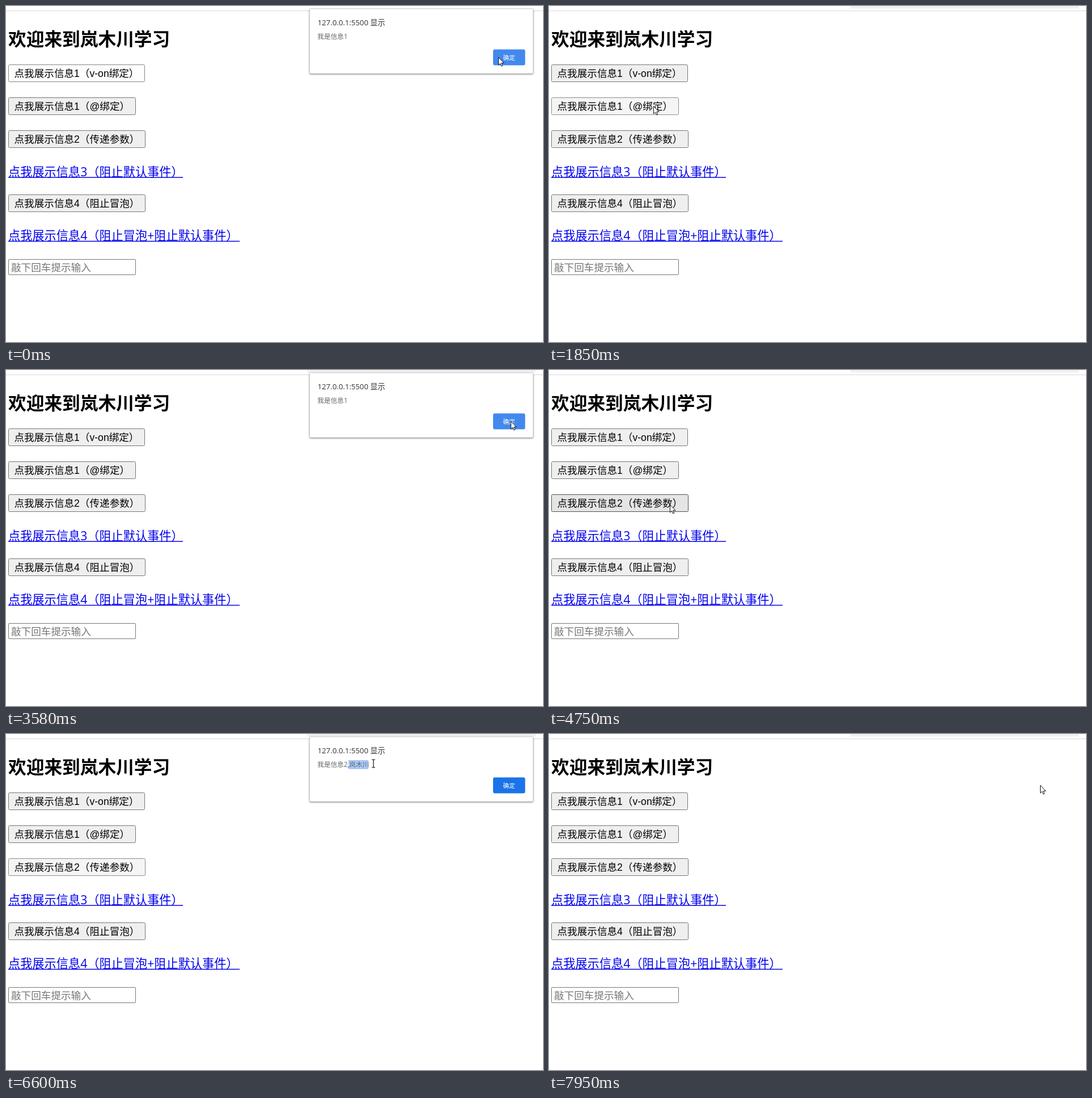
Animation, 947 px wide and 592 px high, one loop 8 s. Source, as an HTML page:

```html
<!DOCTYPE html>
<html lang="zh-CN">
<head>
<meta charset="utf-8">
<style>
  html, body { margin: 0; width: 100%; height: 100%; overflow: hidden; background: #fff; }
  svg { display: block; }
  text { font-family: "Open Sans", "Noto Sans CJK SC", sans-serif; white-space: pre; }
  .arial { font: 17.6px "Liberation Sans", "Noto Sans CJK SC", sans-serif; }
  .link { font-size: 21.2px; fill: #00e; }
  .panel { filter: drop-shadow(0 1px 1.5px rgba(0,0,0,.5)); }
</style>
</head>
<body>
<svg width="947" height="592" viewBox="0 0 947 592">
  <rect id="strip" x="531" width="403" height="4.5" fill="#f1f1f1"/>
  <path d="M0 8.5H947" stroke="#d8d8d8"/>
  <text x="4" y="69.5" font-size="31.7" font-weight="700">欢迎来到岚木川学习</text>
  <g id="buttons"></g>
  <text class="link" x="4" y="299.5">点我展示信息3（阻止默认事件）</text>
  <text class="link" x="4" y="412">点我展示信息4（阻止冒泡+阻止默认事件）</text>
  <path d="M4 302H312M4 414.5H412" stroke="#00e" stroke-width="1.6"/>
  <rect x="4.5" y="446.5" width="224" height="27" rx="1.5" fill="#fff" stroke="#767676"/>
  <text class="arial" x="9" y="466.5" fill="#757575">敲下回车提示输入</text>
  <g id="dialog">
    <rect class="panel" x="535.5" y="5" width="394" height="114" rx="2" fill="#fff" stroke="#c4c4c4" stroke-width=".6"/>
    <text x="549.5" y="34" font-size="13.2" fill="#303236">127.0.0.1:5500 显示</text>
    <rect id="selection" x="604" y="46" height="16" fill="#a8c9f8"/>
    <text id="message" x="549" y="58" font-size="11.7" fill="#65686d"></text>
    <rect id="ok" x="859" y="76.5" width="56.5" height="28" rx="3"/>
    <text x="876.5" y="95" font-size="10.7" font-weight="500" fill="#fff">确定</text>
  </g>
  <path id="arrow" d="M.5 .5V14L3.6 11.2L5.7 16L7.8 15.1L5.8 10.4H10Z" fill="#fff" stroke="#111" stroke-width="1"/>
  <path id="beam" d="M-3 -7H-1L0 -6L1 -7H3M0 -6V6M-3 7H-1L0 6L1 7H3" fill="none" stroke="#111" stroke-width="1.2"/>
</svg>
<script>
const LOOP = 8000, STEP = 89.66;
const $ = id => document.getElementById(id);

const labels = [
  [103, 240, '点我展示信息1（v-on绑定）'],
  [161, 224, '点我展示信息1（@绑定）'],
  [219, 241, '点我展示信息2（传递参数）'],
  [332, 241, '点我展示信息4（阻止冒泡）']
];
$('buttons').innerHTML = labels.map(([y, w, label]) =>
  `<rect x="4.5" y="${y + .5}" width="${w}" height="30" rx="2"/>
   <text class="arial" x="14.5" y="${y + 22}">${label}</text>`).join('');
const boxes = document.querySelectorAll('#buttons rect');

const looks = {
  normal: ['#efefef', '#767676'],
  hover: ['#e5e5e5', '#4f4f4f'],
  active: ['#f5f5f5', '#8d8d8d'],
  pressed: ['#fdfdfd', '#858585']
};

// Pointer path: time, x, y
const path = [
  [0, 868, 90], [60, 868, 90], [850, 543, 105], [1570, 184, 176],
  [2210, 184, 176], [3030, 841, 77], [3490, 890, 90], [3670, 890, 90],
  [3830, 886, 90], [4660, 224, 234], [4720, 213, 237], [5200, 213, 237],
  [5520, 325, 215], [5880, 614, 74], [6230, 607, 53], [6340, 607, 53],
  [6600, 648, 52], [6880, 648, 52], [7410, 881, 90], [7600, 881, 90],
  [7700, 866, 90], [LOOP, 866, 90]
];

function pointer(t) {
  const i = Math.max(1, path.findIndex(p => p[0] >= t));
  const [t0, x0, y0] = path[i - 1], [t1, x1, y1] = path[i];
  const k = (t - t0) / (t1 - t0), e = k * k * (3 - 2 * k);
  return [x0 + (x1 - x0) * e, y0 + (y1 - y0) * e];
}

const within = (t, a, b) => t >= a && t < b;
const show = (el, on) => el.style.display = on ? '' : 'none';

function buttonState(i, t, x) {
  if (i === 0 && t < 60) return 'pressed';
  if (i === 1 && within(t, 1400, 3550))
    return t >= 1840 ? 'active' : x < 228 ? 'hover' : 'normal';
  if (i === 2 && within(t, 4450, 7690))
    return t >= 4980 ? 'active' : x < 245 ? 'hover' : 'normal';
  return 'normal';
}

function dialogOpacity(t) {
  if (t < 60 || within(t, 2100, 3640) || within(t, 5250, 7770)) return 1;
  return within(t, 2010, 2100) || within(t, 5160, 5250) ? .6 : 0;
}

function draw(now) {
  const clock = now % LOOP;
  const t = clock < 52 ? 0 : 60 + Math.floor((clock - 52) / STEP) * STEP;
  const [x, y] = pointer(Math.min(t, LOOP));

  boxes.forEach((box, i) => {
    const [fill, stroke] = looks[buttonState(i, t, x)];
    box.setAttribute('fill', fill);
    box.setAttribute('stroke', stroke);
  });

  show($('strip'), t >= 60);
  $('dialog').style.opacity = dialogOpacity(t);
  $('message').textContent = t > 4500 ? '我是信息2,岚木川' : '我是信息1';
  $('ok').setAttribute('fill', within(t, 6400, 7690) ? '#1a73e8' : '#4289ee');
  $('selection').setAttribute('width', within(t, 6400, LOOP) ? Math.min(35, Math.max(0, x - 604)) : 0);

  const text = within(t, 5900, 7000) && y < 63;
  show($('beam'), text);
  show($('arrow'), !text);
  $(text ? 'beam' : 'arrow').setAttribute('transform', `translate(${Math.round(x)} ${Math.round(y)})`);
}

const start = performance.now();
(function tick() {
  draw(performance.now() - start);
  requestAnimationFrame(tick);
})();
</script>
</body>
</html>
```
